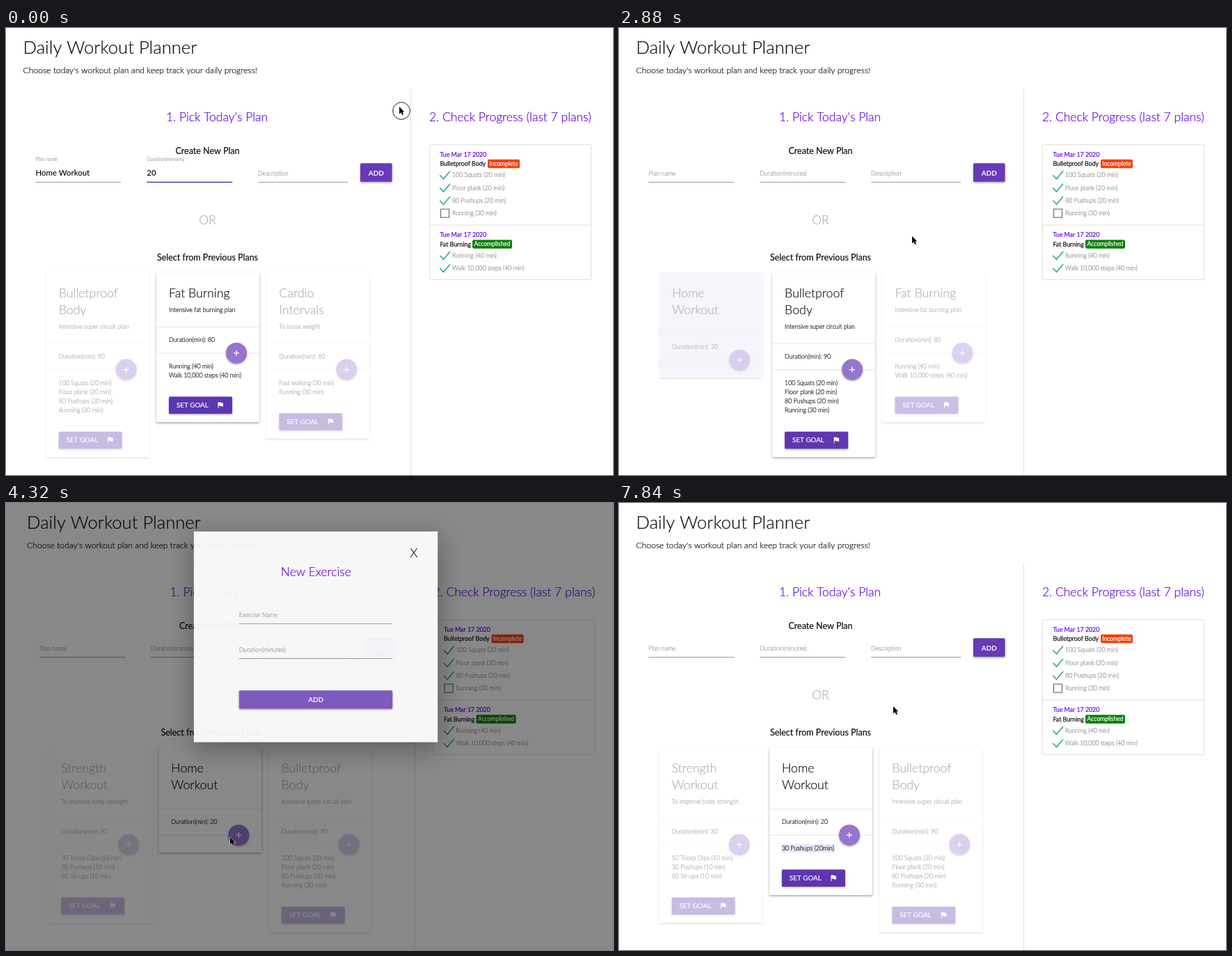
These frames come from a looping animation (872 px wide and 642 px high, 8000 ms). An HTML page with a canvas:

```html
<!DOCTYPE html>
<html lang="en">
<head>
<meta charset="utf-8">
<title>Daily Workout Planner</title>
<style>
  html, body { margin: 0; width: 100%; height: 100%; overflow: hidden; background: #fff; }
  canvas { display: block; }
</style>
</head>
<body>
<canvas id="stage" width="872" height="642"></canvas>
<script>
const WIDTH = 872, HEIGHT = 642, LOOP = 8000, STEP = 160;
const screen2d = document.getElementById('stage').getContext('2d');
const layer = Object.assign(document.createElement('canvas'), { width: WIDTH, height: HEIGHT });
const layer2d = layer.getContext('2d');
let ctx = screen2d;

const CREATE = 2130, BACK = 3175, OPEN = 4160, NAME_FOCUS = 5100, TYPE = 5300,
      DURATION_FOCUS = 6170, CLOSE = 7250;
const VIOLET = '#6200ea', PURPLE = '#673ab7', GREY = '#9e9e9e', SOFT = '#8c8c8c', INK = '#111', RULE = '#e0e0e0';
const SMALL = 8.75, HEADING = 17.5;

const clamp = v => Math.max(0, Math.min(1, v));
const ramp = (t, start, length) => clamp((t - start) / length);

// paints a group as one, so that overlaps and shadows inside it stay opaque
function fade(alpha, paint) {
  layer2d.resetTransform();
  layer2d.clearRect(0, 0, WIDTH, HEIGHT);
  layer2d.setTransform(screen2d.getTransform());
  ctx = layer2d;
  paint();
  ctx = screen2d;
  ctx.save();
  ctx.resetTransform();
  ctx.globalAlpha = alpha;
  ctx.drawImage(layer, 0, 0);
  ctx.restore();
}

// y is the middle of the capital letters; the hairline gives the smoothing of a heavier rasteriser
function text(str, x, y, size, { weight = 300, color = INK, align = 'left' } = {}) {
  ctx.font = `${weight} ${size}px Lato, sans-serif`;
  ctx.fillStyle = ctx.strokeStyle = color;
  ctx.textAlign = align;
  ctx.lineWidth = 0.2;
  ctx.fillText(str, x, y + size * 0.36);
  if (weight < 500) ctx.strokeText(str, x, y + size * 0.36);
}

function box(x, y, w, h, color, radius = 1.5, shadow = 0) {
  ctx.save();
  if (shadow) {
    ctx.shadowColor = 'rgba(0,0,0,.36)';
    ctx.shadowBlur = shadow * 1.7;
    ctx.shadowOffsetY = shadow * 0.75;
  }
  ctx.fillStyle = color;
  ctx.beginPath();
  ctx.roundRect(x, y, w, h, radius);
  ctx.fill();
  ctx.restore();
}

function line(points, color, width = 1) {
  ctx.strokeStyle = color;
  ctx.lineWidth = width;
  ctx.beginPath();
  points.forEach(([x, y]) => ctx.lineTo(x, y));
  ctx.stroke();
}

function field(x, y, w, label, { value = '', lift = 0, focus = 0, tint = GREY } = {}) {
  line([[x, y + 0.5], [x + w, y + 0.5]], GREY);
  if (focus) {
    ctx.save();
    ctx.globalAlpha = focus;
    line([[x, y + 0.5], [x + w, y + 0.5]], '#5e35b1', 1 + focus * 0.6);
    ctx.restore();
  }
  text(label, x, y - 11.7 - 20.5 * lift, SMALL * (1 - 0.2 * lift), { color: tint });
  text(value, x, y - 13.2, 11.4, { weight: 500, color: '#000' });
}

/* ---------- plan cards ---------- */

const plans = [
  { title: ['Strength', 'Workout'], note: 'To improve body strength', minutes: 30,
    steps: ['50 Tricep Dips (10 min)', '30 Pushups (10 min)', '60 Sit-ups (10 min)'] },
  { title: ['Home', 'Workout'], note: '', minutes: 20, steps: [] },
  { title: ['Bulletproof', 'Body'], note: 'Intensive super circuit plan', minutes: 90,
    steps: ['100 Squats (20 min)', 'Floor plank (20 min)', '80 Pushups (20 min)', 'Running (30 min)'] },
  { title: ['Fat Burning'], note: 'Intensive fat burning plan', minutes: 80,
    steps: ['Running (40 min)', 'Walk 10,000 steps (40 min)'] },
  { title: ['Cardio', 'Intervals'], note: 'To loose weight', minutes: 60,
    steps: ['Fast walking (30 min)', 'Running (30 min)'] },
];
const HOME = 1;
const flag = new Path2D('M14.4 6L14 4H5v17h2v-7h5.6l.4 2h7V6z');
const glow = alpha => `rgba(150,113,220,${alpha})`;

function goalButton(x, y) {
  box(x, y, 91, 24.5, '#5e35b1', 1.5, 1.6);
  text('SET GOAL', x + 11, y + 12.2, 9.8, { weight: 400, color: '#fff' });
  ctx.save();
  ctx.translate(x + 68, y + 6);
  ctx.scale(0.5, 0.5);
  ctx.fillStyle = '#fff';
  ctx.fill(flag);
  ctx.restore();
}

function addDot(x, y) {
  box(x - 15, y - 15, 30, 30, '#9575cd', 15, 1.8);
  line([[x - 4, y], [x + 4, y]], '#fff', 1.3);
  line([[x, y - 4], [x, y + 4]], '#fff', 1.3);
}

function card(plan, x, steps, flash, stepFlash) {
  const top = 351, left = x + 18;
  const head = top + 41 + 23.7 * plan.title.length + (plan.note ? 13.7 : 0);
  const mid = head + 37.5;
  const lastStep = mid + 19 + 13.2 * (steps.length - 1);
  const bottom = steps.length ? lastStep + 67 : mid + 25;
  box(x, top, 148, bottom - top, '#fff', 1.5, 2);
  line([[x, head + 0.3], [x + 148, head + 0.3]], '#e6e6e6');
  line([[x, mid + 0.3], [x + 148, mid + 0.3]], '#e6e6e6');
  plan.title.forEach((word, i) => text(word, left, 381 + 23.7 * i, 17.75));
  text(plan.note, left, 381 + 23.7 * plan.title.length, SMALL);
  text(`Duration(min): ${plan.minutes}`, left, head + 18.7, SMALL);
  steps.forEach((step, i) => {
    const y = mid + 19 + 13.2 * i;
    if (stepFlash) box(left - 0.5, y - 6, 76, 12, glow(stepFlash), 0);
    text(step, left, y, SMALL);
  });
  if (flash) box(x, top, 148, bottom - top, glow(flash));
  addDot(x + 115, mid);
  if (steps.length) goalButton(left, lastStep + 30.5);
}

function carouselPosition(t) {
  if (t < CREATE) return 3;
  if (t < BACK) return 2 - Math.min(1, 0.73 * Math.exp((2240 - t) / 192));
  return 1 + Math.exp((BACK - t) / 262);
}

function carousel(t) {
  const position = carouselPosition(t), lead = t < BACK ? 1.62 : 1.1;
  const flash = t < CREATE ? 0 : 0.55 * (1 - ramp(t, 2240, 1000));
  const added = t >= CLOSE;
  const stepFlash = added ? 0.45 * (1 - ramp(t, CLOSE, 1000)) : 0;
  plans
    .map((plan, i) => ({ plan, i, d: i - position }))
    .sort((a, b) => Math.abs(b.d) - Math.abs(a.d))
    .forEach(({ plan, i, d }) => {
      const far = Math.abs(d);
      const alpha = far < 0.5 ? 1 - 0.4 * far : 1 - far * 2 / 3;
      if (alpha <= 0) return;
      // the card leaving the centre runs ahead of its neighbours
      const offset = d < 0 && d > -1 ? -1 + (1 + d) ** lead : d;
      const isHome = i === HOME;
      fade(alpha, () => card(plan, 216 + 158.3 * offset,
        isHome && added ? ['30 Pushups (20min)'] : plan.steps,
        isHome ? flash : 0, isHome ? stepFlash : 0));
    });
}

/* ---------- progress panel ---------- */

function progressEntry(y, name, badge, badgeX, badgeW, badgeColor, items) {
  text('Tue Mar 17 2020', 623.5, y, 8.8, { weight: 400, color: VIOLET });
  text(name, 623.5, y + 13.2, 8.8, { weight: 400 });
  box(badgeX, y + 7, badgeW, 12.5, badgeColor, 2);
  text(badge, badgeX + badgeW / 2, y + 13.2, 8.5, { weight: 400, color: '#fff', align: 'center' });
  items.forEach(([label, done], i) => {
    const row = y + 29.5 + 18.3 * i;
    if (done) {
      line([[623.3, row], [628.5, row + 5.6], [638, row - 5.8]], '#26a69a', 1.5);
    } else {
      ctx.strokeStyle = '#5a5a5a';
      ctx.lineWidth = 1;
      ctx.strokeRect(624.5, row - 6, 12, 12);
    }
    text(label, 641, row, SMALL, { color: SOFT });
  });
}

function progressPanel() {
  ctx.strokeStyle = RULE;
  ctx.lineWidth = 1;
  ctx.beginPath();
  ctx.roundRect(608.5, 167.5, 232, 194, 1.5);
  ctx.stroke();
  line([[608, 283], [841, 283]], RULE);
  progressEntry(181.7, 'Bulletproof Body', 'Incomplete', 692, 46, '#f4400b',
    [['100 Squats (20 min)', true], ['Floor plank (20 min)', true], ['80 Pushups (20 min)', true], ['Running (30 min)', false]]);
  progressEntry(297.2, 'Fat Burning', 'Accomplished', 670, 57, '#0b800b',
    [['Running (40 min)', true], ['Walk 10,000 steps (40 min)', true]]);
}

/* ---------- page and dialog ---------- */

function page(t) {
  const heading = { color: VIOLET, align: 'center' };
  const sub = { weight: 400, align: 'center' };
  const filled = t < CREATE, lift = 1 - ramp(t, CREATE, 200);
  text('Daily Workout Planner', 24.5, 28, 25.65);
  text("Choose today's workout plan and keep track your daily progress!", 24.5, 61, 12.15);
  line([[581.5, 88], [581.5, HEIGHT]], RULE);
  text("1. Pick Today's Plan", 303, 127.5, HEADING, heading);
  text('2. Check Progress (last 7 plans)', 724.3, 127.5, HEADING, heading);
  text('Create New Plan', 289.5, 176.5, 12.5, sub);
  field(42.5, 221, 123, 'Plan name', { value: filled ? 'Home Workout' : '', lift });
  field(202.3, 221, 123, 'Duration(minutes)', { value: filled ? '20' : '', lift, focus: filled ? 1 : lift });
  field(362, 221, 129, 'Description');
  box(509, 194.3, 45.5, 26.5, PURPLE, 1.5, 1.8);
  text('ADD', 531.8, 208, 9.9, { weight: 700, color: '#fff', align: 'center' });
  text('OR', 289.5, 275.5, HEADING, { color: '#b0b0b0', align: 'center' });
  text('Select from Previous Plans', 289.5, 329, 12.5, sub);
  progressPanel();
  carousel(t);
}

function spinner(x, y) {
  ctx.strokeStyle = GREY;
  ctx.lineWidth = 0.8;
  ctx.beginPath();
  ctx.roundRect(x - 3, y - 5.5, 6, 11, 3);
  ctx.stroke();
  line([[x - 1.5, y - 1.5], [x, y - 3.5], [x + 1.5, y - 1.5]], '#444', 0.8);
  line([[x - 1.5, y + 1.5], [x, y + 3.5], [x + 1.5, y + 1.5]], '#444', 0.8);
}

function dialogPanel(t, shown) {
  const nameLift = ramp(t, NAME_FOCUS, 200), durationLift = ramp(t, DURATION_FOCUS, 200);
  const typed = '30 Pushups'.slice(0, Math.max(0, Math.floor((t - TYPE) / 70)));
  const minutes = '20'.slice(0, Math.max(0, Math.floor((t - 6400) / 150)));
  const tint = focus => focus ? '#8a66cf' : GREY;
  const size = 0.88 + 0.12 * shown;

  ctx.save();
  ctx.translate(445, 193.5 - 20 * (1 - shown));
  ctx.scale(size, size);
  ctx.translate(-445, -193.5);
  ctx.save();
  ctx.shadowColor = 'rgba(0,0,0,.36)';
  ctx.shadowBlur = 36;
  ctx.shadowOffsetY = 9;
  ctx.fillStyle = '#fff';
  ctx.fillRect(268.5, 41, 353, 305);
  ctx.restore();
  text('X', 587, 72.3, HEADING, { align: 'center' });
  text('New Exercise', 445.3, 99, HEADING, { color: VIOLET, align: 'center' });
  field(334, 174, 222, 'Exercise Name', {
    value: typed, lift: nameLift, focus: nameLift * (1 - durationLift),
    tint: tint(nameLift && durationLift < 1),
  });
  field(334, 224.5, 222, 'Duration(minutes)', {
    value: minutes, lift: durationLift, focus: durationLift && 0.4 + 0.6 * durationLift,
    tint: tint(durationLift),
  });
  if (durationLift) {
    spinner(551, 211);
    if (!minutes) line([[334.5, 205], [334.5, 217.5]], '#000');
  } else if (nameLift && !typed) {
    line([[334.5, 154], [334.5, 166.5]], '#000');
  }
  box(334, 271, 222, 26.5, '#7e57c2', 1.5, 1.8);
  text('ADD', 445, 284.3, 9.9, { weight: 700, color: '#fff', align: 'center' });
  ctx.restore();
}

function dialog(t, shown) {
  ctx.fillStyle = `rgba(0,0,0,${shown / 2})`;
  ctx.fillRect(0, 0, WIDTH, HEIGHT);
  fade(shown, () => dialogPanel(t, shown));
}

/* ---------- pointer ---------- */

const pointers = {
  arrow: new Path2D('M0 0V10.5L2.4 8.3 4.2 12 6 11.2 4.3 7.6H7.3z'),
  hand: new Path2D('M3 7V1.2a1 1 0 0 1 2 0V5l5 1.2q1 .4 1 1.6l-1 5H4L.5 8.5q0-1.5 2.5 0z'),
  beam: new Path2D('M-2 0Q0 0 0 1.5Q0 0 2 0M0 1.5V9.5M-2 11Q0 11 0 9.5Q0 11 2 11M-1.2 6.5H1.2'),
};
const trail = [
  [0, 565, 113, 'arrow'], [1120, 524, 217, 'hand'], [2300, 524, 217, 'arrow'],
  [2880, 421, 299, 'arrow'], [BACK, 170, 420, 'arrow'], [3680, 304, 476, 'hand'],
  [OPEN, 304, 476, 'arrow'], [4320, 322, 480, 'arrow'], [4480, 322, 480, 'arrow'],
  [5000, 400, 156, 'beam'], [5960, 400, 156, 'beam'], [6160, 377.5, 209, 'beam'],
  [6700, 377.5, 209, 'arrow'], [7040, 394, 292, 'hand'], [7400, 394, 292, 'arrow'],
];

function pointer(t) {
  const at = trail.findLastIndex(key => key[0] <= t);
  const [start, x0, y0, kind] = trail[at];
  const [end, x1, y1] = trail[at + 1] || [LOOP, x0, y0];
  const p = ramp(t, start, end - start), k = p * p * (3 - 2 * p);
  if (t < STEP) {
    ctx.strokeStyle = '#222';
    ctx.lineWidth = 1;
    ctx.beginPath();
    ctx.arc(568, 119, 12.3, 0, Math.PI * 2);
    ctx.stroke();
  }
  ctx.save();
  ctx.translate(x0 + (x1 - x0) * k, y0 + (y1 - y0) * k);
  ctx.lineWidth = 1;
  ctx.strokeStyle = kind === 'arrow' ? '#fff' : '#000';
  ctx.fillStyle = kind === 'hand' ? '#fff' : '#000';
  ctx.stroke(pointers[kind]);
  if (kind !== 'beam') ctx.fill(pointers[kind]);
  ctx.restore();
}

function draw(now) {
  const t = Math.floor(((now + 8) % LOOP) / STEP) * STEP;
  const shown = ramp(t, OPEN - 1, 172) * (1 - ramp(t, CLOSE, 250));
  ctx.fillStyle = '#fff';
  ctx.fillRect(0, 0, WIDTH, HEIGHT);
  ctx.save();
  if (shown) ctx.translate(5.5, 0); // the scrollbar is hidden while the dialog is open
  page(t);
  ctx.restore();
  if (shown) dialog(t, shown);
  pointer(t);
  requestAnimationFrame(draw);
}
requestAnimationFrame(draw);
</script>
</body>
</html>
```
